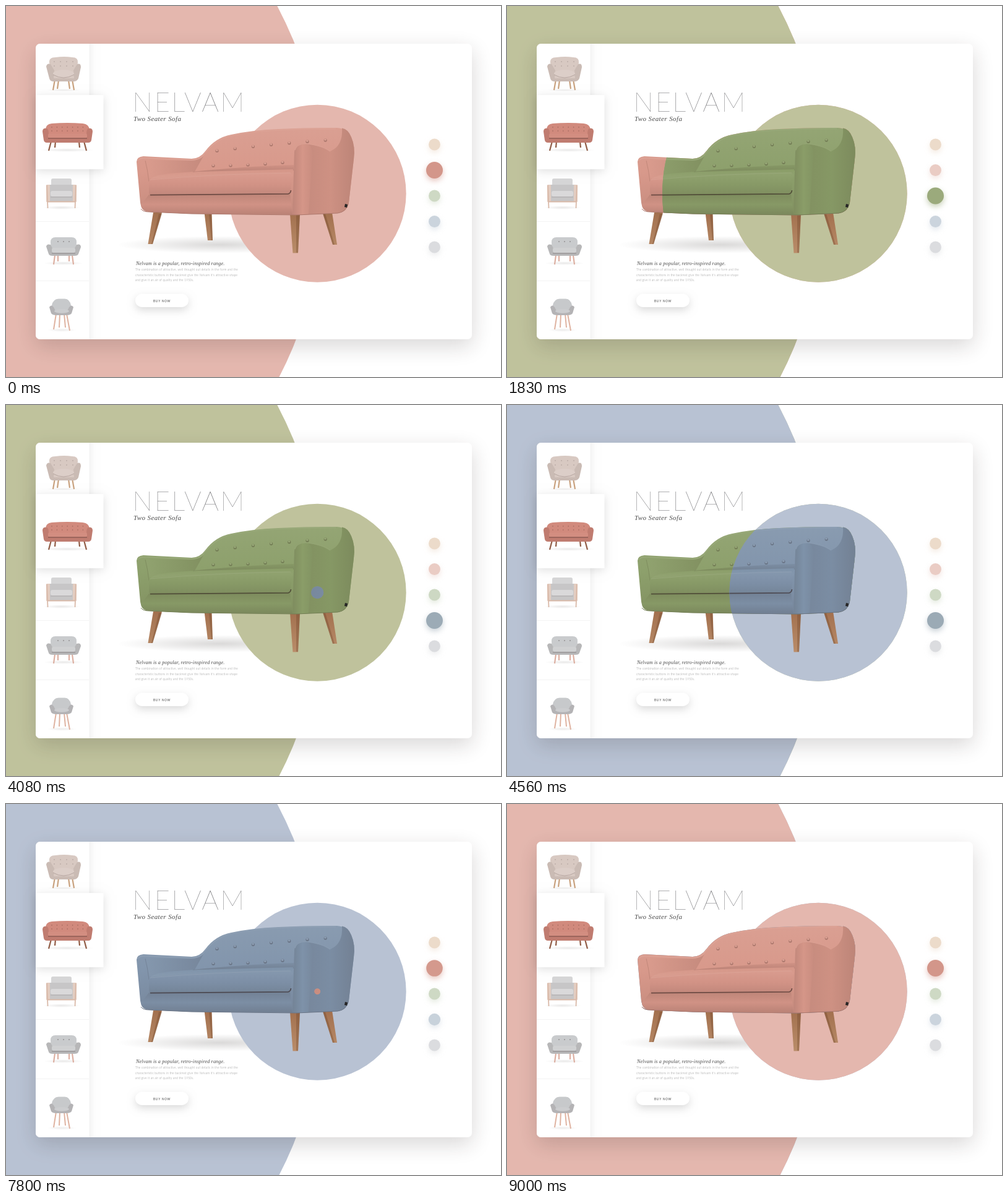
An HTML page with a canvas for the animation above (9030 ms loop, 800 by 600 pixels).

```html
<!DOCTYPE html>
<html lang="en">
<head>
<meta charset="utf-8">
<title>Sofa shop</title>
<style>
html, body { margin: 0; width: 800px; height: 600px; overflow: hidden; background: #fff; }
canvas, svg { position: absolute; left: 0; top: 0; width: 800px; height: 600px; }
.title { font: 100 43.5px Lato, Inter, sans-serif; letter-spacing: 2.6px; fill: #5a5a5e; }
.serif { font-family: "Liberation Serif", "Noto Serif", serif; font-style: italic; fill: #4c4c4c; }
.kind { font-size: 11px; letter-spacing: .4px; }
.lead { font-size: 8.2px; letter-spacing: .13px; }
.copy { font: 300 4.7px Lato, Inter, sans-serif; letter-spacing: .22px; fill: #858585; }
.buy { font: 400 4.8px Lato, Inter, sans-serif; letter-spacing: .75px; fill: #444; }
</style>
</head>
<body>
<canvas id="stage" width="800" height="600"></canvas>
<svg viewBox="0 0 800 600">
  <text class="title" x="204.5" y="171">NELVAM</text>
  <text class="serif kind" x="206" y="186">Two Seater Sofa</text>
  <text class="serif lead" x="210" y="419">Nelvam is a popular, retro-inspired range.</text>
  <g class="copy">
    <text x="209" y="428">The combination of attractive, well thought out details in the form and the</text>
    <text x="209" y="436.7">characteristic buttons in the backrest give the Nelvam it's attractive shape</text>
    <text x="209" y="445">and give it an air of quality and the 1950s.</text>
  </g>
  <text class="buy" x="238" y="478.6">BUY NOW</text>
</svg>
<script>
const ctx = document.getElementById('stage').getContext('2d');
const LOOP = 9030;
const GROW = 2000;         // duration of one colour reveal
const REACH = 303;         // final reveal radius over the sofa
const DISC = { x: 503.2, y: 303.2, r: 143.5 };
const BACK = { x: -135, y: 303, r: 648.5 };

const pink = { row: 1, bg: [228, 183, 174], sofa: [215, 151, 137], on: [211, 150, 138] };
const green = { row: 2, bg: [191, 194, 156], sofa: [139, 158, 105], on: [155, 170, 124] };
const blue = { row: 3, bg: [184, 194, 211], sofa: [127, 147, 170], on: [155, 170, 181] };
const steps = [
  { from: pink, to: green, start: 592, hover: 20, hoverEnd: 1380 },
  { from: green, to: blue, start: 3574, hover: 2430, hoverEnd: 4200 },
  { from: blue, to: pink, start: 7380, hover: 6050, hoverEnd: 8100 }
];
const swatches = [[236, 219, 202], [234, 204, 196], [206, 217, 196], [203, 212, 221], [219, 220, 223]];

const clamp = v => Math.max(0, Math.min(1, v));
const smooth = v => v * v * (3 - 2 * v);
const quart = v => v < .5 ? 8 * v ** 4 : 1 - 8 * (1 - v) ** 4;
const mix = (a, b, k) => a.map((v, i) => v + (b[i] - v) * k);
const css = (c, a = 1) => `rgba(${c.map(Math.round)},${a})`;
const tone = (c, k) => css(mix(c, k < 0 ? [44, 28, 26] : [255, 250, 247], Math.abs(k)));

function shape(d, fill) {
  ctx.fillStyle = fill;
  ctx.fill(new Path2D(d));
}
function line(d, color, width = 1) {
  ctx.strokeStyle = color;
  ctx.lineWidth = width;
  ctx.stroke(new Path2D(d));
}
function disc(x, y, r, fill) {
  oval(x, y, r, r, fill);
}
function oval(x, y, rx, ry, fill) {
  ctx.fillStyle = fill;
  ctx.beginPath();
  ctx.ellipse(x, y, rx, ry, 0, 0, 7);
  ctx.fill();
}
function fade(x0, y0, x1, y1, ...colors) {
  const g = ctx.createLinearGradient(x0, y0, x1, y1);
  colors.forEach((c, i) => g.addColorStop(i / (colors.length - 1), c));
  return g;
}
function shadowed(color, blur, dy, draw) {
  ctx.save();
  ctx.shadowColor = color;
  ctx.shadowBlur = blur;
  ctx.shadowOffsetY = dy;
  draw();
  ctx.restore();
}
function box(x, y, w, h, r, fill) {
  ctx.fillStyle = fill;
  ctx.beginPath();
  ctx.roundRect(x, y, w, h, r);
  ctx.fill();
}
function clipped(x, y, r, draw) {
  if (r <= 0) return;
  ctx.save();
  ctx.beginPath();
  ctx.arc(x, y, r, 0, 7);
  ctx.clip();
  draw();
  ctx.restore();
}
function floor(x, y, rx, ry, alpha) {
  ctx.save();
  ctx.translate(x, y);
  ctx.scale(1, ry / rx);
  const g = ctx.createRadialGradient(0, 0, 0, 0, 0, rx);
  g.addColorStop(0, `rgba(70,65,62,${alpha})`);
  g.addColorStop(1, 'rgba(70,65,62,0)');
  disc(0, 0, rx, g);
  ctx.restore();
}

function legs() {
  const wood = fade(0, 336, 0, 398, '#a3714f', '#b98c69');
  shape('M238 334H252L237 385H229.5Z', wood);
  shape('M320.5 334H332.5L334 379H326Z', wood);
  shape('M459 336H475L472 399.5H463.5Z', wood);
  shape('M512 335L527 334 535 386H528Z', wood);
  shape('M247 336H252L237 385H235Z M328 336H332L334 379H332Z M469 338H475L472 399H469Z M512 336H516L531 386H528Z', 'rgba(95,55,30,.28)');
}

function sofa(c) {
  shape('M211 252Q211 244 222 243L300 247Q313 247 322 235Q338 213 364 208Q396 201 440 199Q490 196.5 535 197Q551 198 558 212Q565 228 562 248L554 318Q551 333 536 335L470 338 300 336 232 333Q219 332 217 318Z',
    fade(0, 197, 0, 338, tone(c, .08), tone(c, .02), tone(c, -.1)));
  line('M318 241Q340 214 366 209Q400 202.5 440 200.5Q490 198 533 198.5', tone(c, .12), 1.6);
  shape('M227 249L300 250Q314 249 319 243L305 268 262 271 232 279Z',
    fade(228, 0, 316, 0, tone(c, .04), tone(c, -.1)));
  line('M213 250Q217 245 226 246L300 249Q312 249 320 240', tone(c, .12), 1.6);
  line('M225 250Q229 265 231 284', tone(c, -.14), .9);
  shape('M302 268Q390 259 465 257V266L302 271Z',
    fade(0, 257, 0, 269, tone(c, -.04), tone(c, -.17)));
  shape('M231 305L459 303 463 337 300 336 232 333Q219 332 218 322Z',
    fade(0, 305, 0, 337, tone(c, -.14), tone(c, -.04), tone(c, -.17)));
  shape('M231 285Q233 276 250 273L310 268 464 264 463 276Z',
    fade(0, 264, 0, 282, tone(c, -.01), tone(c, .08)));
  shape('M231 284Q232 279 242 279Q350 270 456 269Q463 269 462 275L460 300Q460 303 456 303L236 306Q231 306 231 301Z',
    fade(0, 270, 0, 306, tone(c, .05), tone(c, -.03), tone(c, -.13)));
  line('M233 281Q340 271.5 460 270', tone(c, .11), 1);
  line('M233 305.7L456 303.8Q460 303 460.5 298', tone(c, -.62), 1.7);

  // outer arm wraps up into the back, its front panel catches the light
  shape('M480 222Q512 226 524 235Q545 226 543 197.5Q553 199 558 212Q565 228 562 248L554 318Q551 333 536 335L487 337Z',
    fade(486, 0, 562, 0, tone(c, -.1), tone(c, -.05), tone(c, -.15)));
  shape('M466 236Q468 221 484 222Q496 224 495 242L489 337 463 338Z',
    fade(464, 0, 495, 0, tone(c, -.13), tone(c, -.01), tone(c, -.08)));
  line('M467 233Q470 222 486 222.6Q512 226 524 235', tone(c, .08), 1.4);
  line('M218 328Q221 333 232 333L300 336 470 338 536 335Q550 333 553 320', tone(c, -.24), 1);
  const tuft = (x, y) => {
    disc(x, y + .7, 2.6, tone(c, -.26));
    disc(x - .2, y - .2, 1.7, tone(c, .1));
  };
  for (let i = 0; i < 7; i++) tuft(341 + i * 29.2, 233.5 - i * 3.7 + i * i * .14);
  for (let i = 0; i < 5; i++) tuft(335 + i * 28, 257.6 - i * i * .32);
  shape('M548 320L552 321 551 326 547 325Z', '#252424');
}

function thumbs() {
  // button-back armchair
  const sand = [214, 199, 192];
  floor(93, 136, 28, 2, .1);
  line('M79 119L76 136M107 119L110 136M85 120L83 134M101 120L103 134', '#c9a27f', 2.2);
  shape('M70 92Q69 83 80 83Q94 81 107 83Q117 83 116 92L112 118H75Z', tone(sand, .04));
  shape('M65 98Q66 92 72 94L78 104 77 117 110 117 109 104 115 94Q121 92 121 99L117 117Q115 122 109 122H77Q71 122 70 117Z', tone(sand, -.07));
  oval(93, 109.5, 17, 6.5, tone(sand, .14));
  line('M76 111Q93 121 110 111', tone(sand, -.25), .8);
  for (let i = 0; i < 8; i++) disc(78 + i % 4 * 10, 90 + (i >> 2) * 7, .8, tone(sand, -.25));

  // selected sofa
  const coral = [208, 135, 121];
  floor(99, 233, 44, 3, .12);
  line('M73 219L69 234M126 219L130 234M80 219L79 229M118 219L119 229', '#93604a', 2.3);
  shape('M64 200Q64 191 74 190Q99 188 124 190Q134 191 135 200V216H64Z', tone(coral, .03));
  shape('M59 203Q59 197 66 198Q69 199 69 207H130Q130 199 133 198Q140 197 140 203L138 217Q137 221 133 221H66Q62 221 61 217Z', tone(coral, -.1));
  box(68, 206.5, 63, 7, 2, tone(coral, .06));
  line('M68 214H131', tone(coral, -.55), 1.2);
  for (let i = 0; i < 14; i++) disc(74 + i % 7 * 8.4, 196 + (i > 6) * 6, .8, tone(coral, -.33));

  // wooden-side armchair
  const ash = [211, 211, 212];
  floor(90, 326, 30, 3, .13);
  box(73, 279, 33, 24, 3, tone(ash, .05));
  box(69, 289, 42, 27, 2, tone(ash, -.07));
  box(72, 299, 35, 9, 3, tone(ash, .16));
  line('M72 309H107', tone(ash, -.25), .8);
  box(65, 289, 6, 28, 1, '#e3cdc1');
  box(108, 289, 6, 28, 1, '#e3cdc1');
  line('M67.5 327L66 290M111.5 327L113 290M67 316.5H112', '#d9b9a8', 1.8);

  // wide armchair
  const grey = [198, 200, 202];
  floor(93, 416, 32, 3, .12);
  line('M79 403L77 418M107 403L109 418M84 403V413M102 403V413', '#dcaea0', 2.1);
  shape('M72 382Q72 374 80 374H106Q114 374 114 382L113 402H73Z', tone(grey, .06));
  shape('M65 389Q66 384 72 386L76 394H110L114 386Q121 384 121 390L117 401Q116 404 111 404H75Q70 404 69 401Z', tone(grey, -.1));
  box(74, 391, 38, 8, 3, tone(grey, .18));
  line('M74 400H112', tone(grey, -.4), .9);
  for (let i = 0; i < 3; i++) disc(84 + i * 9, 381, .9, tone(grey, -.35));

  // dining chair
  floor(90, 524, 24, 3, .1);
  line('M81 498L77 523M98 498L103 525M87 498L86 520M94 498L96 520', '#dfb3a1', 2);
  shape('M74 484Q76 474 85 473.5H95Q103 474 105 484L106 496H73Z', tone(grey, .02));
  shape('M70 487Q73 482 77 487L80 493H99L102 487Q106 482 109 487L106 497Q104 500 98 500H81Q75 500 73 497Z', tone(grey, -.12));
  oval(90, 493.5, 12, 3.2, tone(grey, .1));
}

function card() {
  shadowed('rgba(40,30,30,.18)', 34, 11, () => box(48, 61, 705, 478, 7, '#fff'));
  ctx.save();
  ctx.beginPath();
  ctx.roundRect(48, 61, 705, 478, 7);
  ctx.clip();
  shadowed('rgba(0,0,0,.09)', 12, 0, () => box(40, 50, 94.5, 500, 0, '#fff'));
  box(48, 348, 86, 1, 0, '#f3f3f3');
  box(48, 444, 86, 1, 0, '#f3f3f3');
  ctx.restore();
  shadowed('rgba(0,0,0,.12)', 14, 3, () => box(48, 144, 109.5, 120, 0, '#fff'));
  thumbs();
  shadowed('rgba(0,0,0,.14)', 13, 5, () => box(209, 465.5, 86, 21.5, 10.7, '#fff'));
}

function palette(t) {
  const active = [0, 1, 0, 0, 0];
  for (const s of steps) {
    if (t < s.hover) continue;
    const k = smooth(clamp((t - s.hover) / (s.hoverEnd - s.hover)));
    active[s.from.row] = 1 - k;
    active[s.to.row] = k;
  }
  const strong = { 1: pink.on, 2: green.on, 3: blue.on };
  swatches.forEach((base, i) => {
    const k = active[i];
    const color = strong[i] ? mix(base, strong[i], k) : base;
    shadowed(css(color, .55), 10, 4, () => disc(692.5, 224 + i * 41.5, 9.4 + 4.1 * k, css(color)));
  });
}

function draw(t) {
  let step = { from: pink, to: pink, start: 0 };
  for (const s of steps) if (t >= s.start) step = s;
  const { from, to } = step;
  const r = from === to ? 0 : REACH * quart(clamp((t - step.start) / GROW));
  const scale = Math.min(1, r / DISC.r);

  ctx.fillStyle = '#fff';
  ctx.fillRect(0, 0, 800, 600);
  disc(BACK.x, BACK.y, BACK.r, css(from.bg));
  if (r) disc(BACK.x, BACK.y, BACK.r * scale, css(to.bg));
  card();
  floor(345, 386, 165, 14, .2);
  disc(DISC.x, DISC.y, DISC.r, css(from.bg));
  if (r) disc(DISC.x, DISC.y, DISC.r * scale, css(to.bg));
  legs();
  sofa(from.sofa);
  clipped(DISC.x, DISC.y, r, () => sofa(to.sofa));
  palette(t);
}

function tick() {
  draw(performance.now() % LOOP);
  requestAnimationFrame(tick);
}
tick();
</script>
</body>
</html>
```
